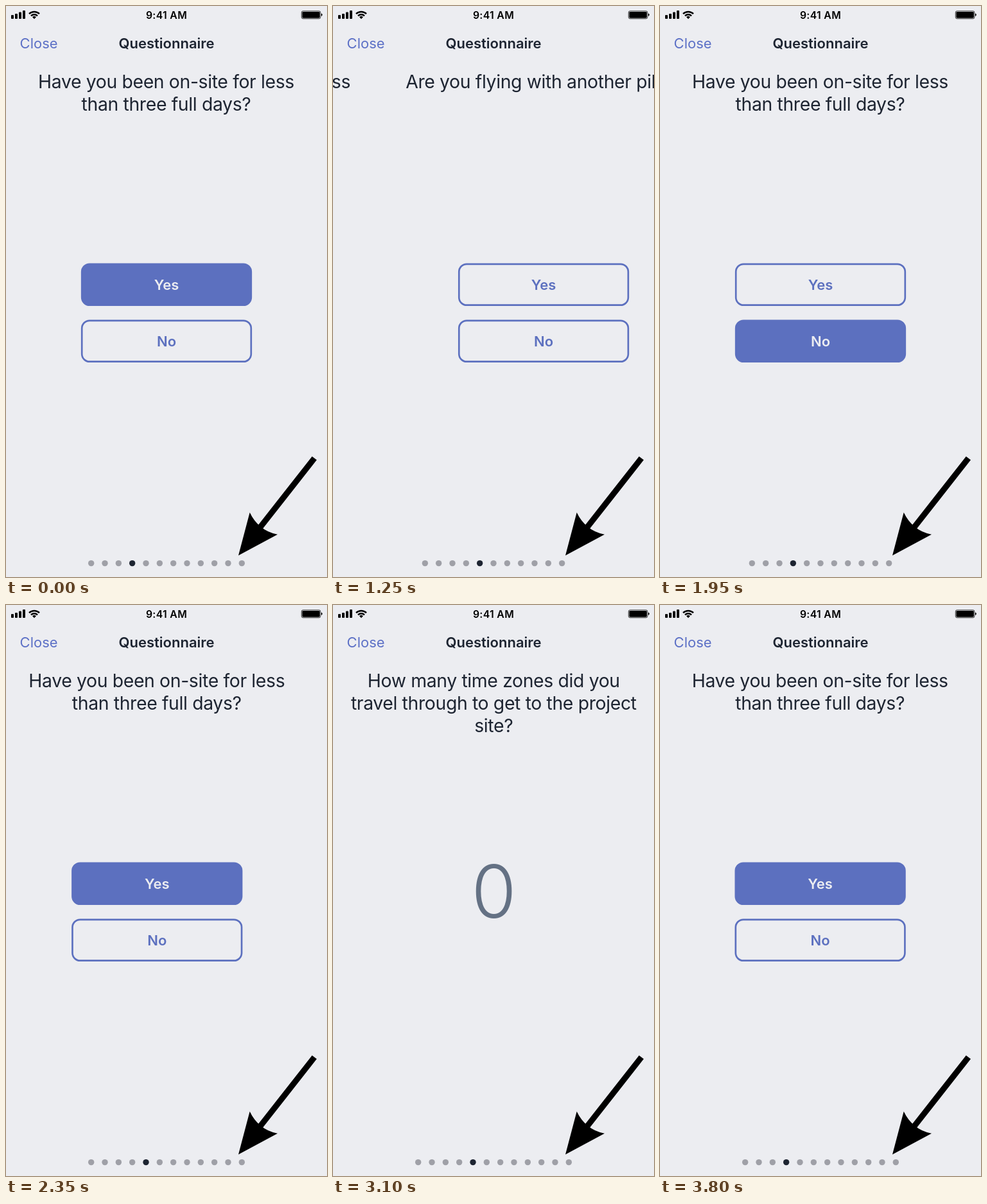
An HTML page for the animation above (3.9 s loop, 500 by 889 pixels).

```html
<!DOCTYPE html>
<html lang="en">
<head>
<meta charset="utf-8">
<title>Questionnaire</title>
<style>
  html, body { margin: 0; width: 100%; height: 100%; overflow: hidden; background: #ecedf1; }
  svg { display: block; width: 100%; height: 100%; }
  text {
    font-family: Inter, "Liberation Sans", sans-serif;
    font-optical-sizing: none;
    text-anchor: middle;
    fill: #1d2431;
  }
  .question { font-size: 28.4px; letter-spacing: -.013em; }
  .bold, .btn text { font-size: 22px; font-weight: 600; }
  .close { font-size: 22px; text-anchor: start; fill: #5c70c6; }
  .clock { font-size: 15.8px; font-weight: 600; letter-spacing: .02em; fill: #000; }
  .count { font-size: 113.5px; font-weight: 300; fill: #647184; }
  .btn rect { fill: none; stroke: #5c70bf; stroke-width: 2.67px; }
  .btn text { fill: #5c70bf; }
  .btn .on rect { fill: #5c70bf; }
  .btn .on text { fill: #ecedf1; }
  .wifi { fill: none; stroke: #000; stroke-width: 2.5px; }
</style>
</head>
<body>
<svg viewBox="0 0 500 889" preserveAspectRatio="none">
  <g id="bars">
    <rect x="8" y="14" width="4" height="6" rx="1"/>
    <rect x="14" y="12" width="4" height="8" rx="1"/>
    <rect x="20" y="9.5" width="4" height="10.5" rx="1"/>
    <rect x="26" y="7" width="4" height="13" rx="1"/>
  </g>
  <path class="wifi" d="M36 12.2a11.4 11.4 0 0 1 16 0M39 15.3a7 7 0 0 1 10 0"/>
  <path d="M44 20.2l-2.9-3a4.2 4.2 0 0 1 5.8 0z"/>
  <text class="clock" x="250" y="19.5">9:41 AM</text>
  <rect x="460.3" y="7.8" width="29.6" height="12" rx="2.4" fill="none" stroke="#000" stroke-width=".8"/>
  <rect x="461.4" y="8.9" width="27.4" height="9.8" rx="1.4"/>
  <path d="M491 11.6q1.8 .6 1.8 2.2t-1.8 2.2z"/>

  <text class="close" x="21.6" y="65.7">Close</text>
  <text class="bold" x="250" y="65.7">Questionnaire</text>

  <g id="site"></g>
  <g id="pilot"></g>
  <g id="zones"></g>

  <g id="dots"></g>
  <path d="M480.4 704L394 814" stroke="#000" stroke-width="9.2"/>
  <path d="M362 855.5L379.7 788.5Q386 802 397 811Q408 820 423 822.7Z"/>
</svg>
<script>
const LOOP = 3900, STEP = 50, WIDTH = 500;
const SLIDE_NO = 406, SLIDE_YES = 2340;
const $ = id => document.getElementById(id);
const clamp = v => Math.min(1, Math.max(0, v));

const question = lines => lines.map((s, i) =>
  `<text class="question" x="249.5" y="${128.3 + 35 * i}">${s}</text>`).join('');

const face = (label, y) =>
  `<rect x="118.2" y="${y + 1.3}" width="263.6" height="63.9" rx="12"/>
   <text x="250" y="${y + 41.5}">${label}</text>`;

const button = (label, y, id) =>
  `<g class="btn"><g ${id ? `id="${id}Off"` : ''}>${face(label, y)}</g>` +
  (id ? `<g class="on" id="${id}On">${face(label, y)}</g>` : '') + '</g>';

$('site').innerHTML = question(['Have you been on-site for less', 'than three full days?']) +
  button('Yes', 400.5, 'yes') + button('No', 488.5, 'no');
$('pilot').innerHTML = question(['Are you flying with another pilot?']) +
  button('Yes', 400.5) + button('No', 488.5);
$('zones').innerHTML = question(['How many time zones did you', 'travel through to get to the project', 'site?']) +
  '<text class="count" x="249.7" y="486.7">0</text>';
$('dots').innerHTML = '<circle cy="867.6" r="4.7"/>'.repeat(12);
const dots = [...$('dots').children];

// Automatic advance: critically damped spring
function spring(t, start) {
  const x = Math.max(0, t - start) * .0265;
  return 1 - (1 + x) * Math.exp(-x);
}

// Finger drag up to the release, then exponential settling
function swipe(t, start, release) {
  if (t < release) return .534 * clamp((t - start) / (release - start)) ** 3;
  return 1 - .466 * Math.exp((release - t) / 62);
}

function position(t) {
  if (t < 900) return spring(t, SLIDE_NO);
  if (t < 2000) return 1 - swipe(t, 950, 1402);
  if (t < 3000) return spring(t, SLIDE_YES);
  return 1 - swipe(t, 3050, 3400);
}

const place = (id, x) => $(id).setAttribute('transform', `translate(${x.toFixed(2)} 0)`);

function choose(id, amount) {
  $(id + 'On').setAttribute('opacity', amount);
  $(id + 'Off').setAttribute('opacity', amount < 1 ? 1 : 0);
}

function draw(t) {
  let pos = position(t);
  if (Math.abs(pos - Math.round(pos)) < .0005) pos = Math.round(pos);

  const yes = t < 2000 ? 1 - clamp((t - 30) / 300) : clamp((t - 2080) / 220);
  choose('yes', yes);
  choose('no', 1 - yes);

  const short = t >= SLIDE_NO && t < SLIDE_YES;
  place('site', -pos * WIDTH);
  place('pilot', (1 - pos) * WIDTH);
  place('zones', (1 - pos) * WIDTH);
  $('pilot').setAttribute('display', short ? 'inline' : 'none');
  $('zones').setAttribute('display', short ? 'none' : 'inline');

  const sliding = (t >= SLIDE_NO && t < 900) || (t >= SLIDE_YES && t < 3000);
  const active = sliding || pos >= .5 ? 4 : 3;
  const count = short ? 11 : 12;
  dots.forEach((dot, i) => {
    dot.setAttribute('cx', 250 + (i - (count - 1) / 2) * 21.33);
    dot.setAttribute('fill', i === active ? '#1d2431' : '#9fa0a7');
    dot.setAttribute('display', i < count ? 'inline' : 'none');
  });
}

const begin = performance.now();
function tick() {
  const t = (performance.now() - begin) % LOOP;
  draw(Math.floor(t / STEP) * STEP);
  requestAnimationFrame(tick);
}
draw(0);
requestAnimationFrame(tick);
</script>
</body>
</html>
```
